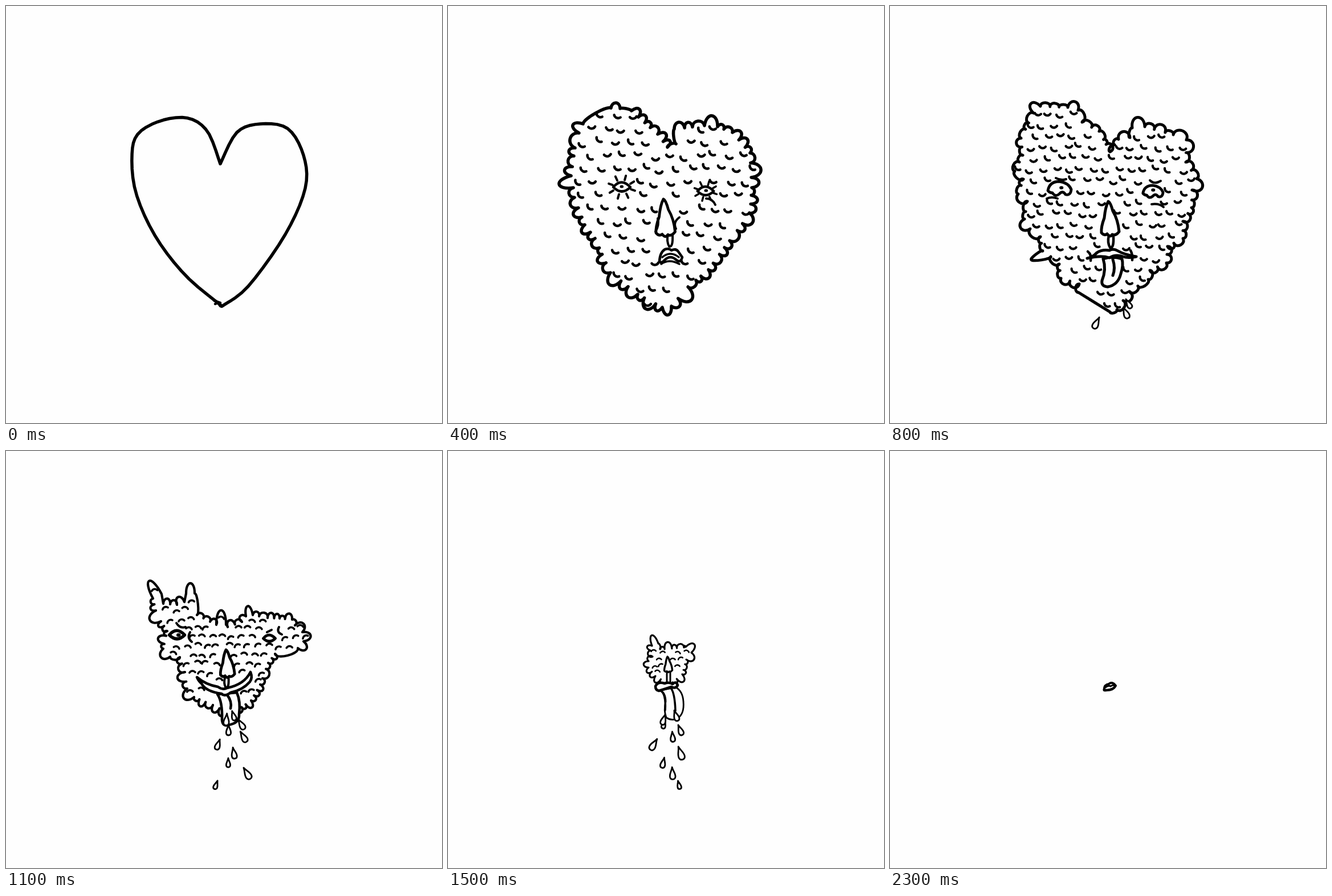
These frames come from a looping animation (765 px wide and 732 px high, 2400 ms). An HTML page with a canvas:

```html
<!DOCTYPE html>
<html lang="en">
<head>
<meta charset="utf-8">
<title>Shrinking heart</title>
<style>
html, body { margin: 0; width: 100%; height: 100%; overflow: hidden; background: #fefefe; }
canvas { display: block; }
</style>
</head>
<body>
<canvas id="stage" width="765" height="732"></canvas>
<script>
const STEP = 100, STEPS = 24, PAPER = '#fefefe', PIVOT = { x: 386, y: 424 };
const ctx = document.getElementById('stage').getContext('2d');

const lerp = (a, b, u) => a + (b - a) * u;
const noise = n => { const v = Math.sin(n * 12.9898 + 4.1) * 43758.5453; return v - Math.floor(v); };

// Small shapes drawn around their own origin
const NOSE = 'M0 0Q-5 9 -7 29Q-13 45 -12 55Q-7 61 -2 57Q3 64 7 58Q13 61 19 53Q17 32 8 17Q4 2 0 0Z';
const GROOVE = 'M0 60Q-3 72 2 81Q9 83 8 61';
const ALMOND = 'M-15 0Q-1 -17 15 0Q0 15 -15 0Z';
const DROOP = 'M-20 2Q-17 -14 0 -14Q16 -12 21 0Q20 11 11 9Q6 1 0 8Q-7 14 -12 6Q-17 6 -20 2Z';
const DOT = 'M0 0h1.5';
const TEAR = new Path2D('M0 -.5C.05 -.2 .25 0 .22 .28C.18 .55 -.18 .55 -.22 .28C-.25 0 -.05 -.2 0 -.5Z');
const LASHES = Array.from({ length: 8 }, (_, i) => {
  const a = i * Math.PI / 4 + .3, c = Math.cos(a), s = Math.sin(a);
  return `M${c * 17} ${s * 13}L${c * 24} ${s * 21}`;
}).join('');

// Outline corners run clockwise: right from cleft to tip, left from tip to cleft.
// A third value makes the next side one single lobe of that height / width.
// Face parts are [path, line width, x, y, scale].
const poses = [
  {
    at: 0, size: 340, line: 5.5,
    right: '376,277 405,222 446,207 494,215 522,262 525,320 490,401 425,492 379,527',
    left: '379,527 315,473 262,404 228,328 221,262 232,224 273,201 320,197 354,221 376,277',
    face: [['M365 517L376 521M367 523L372 521M374 523Q376 530 381 526', 4.5]]
  },
  {
    at: 4, size: 350, line: 5.5, gap: 18, bump: .6, flare: -.08, tip: 999,
    mark: { gap: 27, r: 7, width: 4.5, turn: .4 },
    right: '385,248,.2 400,242,.1 397,216 450,210,.8 473,212 499,222 530,258 533,319 530,364 485,424 457,463 421,493 392,527,.9 376,529',
    left: '376,529 333,506 285,468 258,408 240,384 222,336 220,319,1.1 216,298 223,249 230,223,.9 237,207,.1 286,179,.6 302,180,.1 322,184,.7 334,195 368,225 385,248',
    face: [
      [LASHES, 4, 305, 318], [ALMOND, 4.5, 305, 318], [DOT, 5, 304, 317],
      [LASHES, 3.5, 452, 325, .85], [ALMOND, 4.5, 452, 325, .95], [DOT, 5, 452, 324],
      [NOSE, 4.8, 378, 339, 1.08], [GROOVE, 4, 386, 341],
      ['M406 371Q394 380 400 391M368 373Q371 385 364 396M453 338Q464 338 469 349', 4],
      ['M371 448Q372 432 381 427Q388 425 392 429Q400 425 404 431L411 441Q408 452 401 446Q390 436 380 446Q374 453 371 448Z', 4.5],
      ['M374 453Q388 443 406 453M376 441Q390 429 405 441', 3.5]
    ]
  },
  {
    at: 8, size: 340, line: 5, gap: 16, bump: .45, flare: .06, tip: 510,
    mark: { gap: 22.5, r: 6.5, width: 4.2, turn: .35 },
    right: '386,256 401,234 421,231,.2 425,214,.8 447,212 497,226,.5 520,235 519,274 538,303,.7 530,323 529,354 514,378 514,408 487,422 485,451 456,464 453,480 420,501 398,533 386,537',
    left: '386,537,0 331,503 332,488 300,478 297,453 282,440,.1 248,445,.1 268,430 264,405 246,391,.7 236,374 241,343 225,330 234,304 219,290 233,262 230,232 252,188,.9 264,176 312,178,.7 330,183 337,204 367,220 386,256',
    face: [
      [DROOP, 4.8, 297, 322], [DOT, 5.5, 300, 319], [DROOP, 4.8, 461, 327, .86], [DOT, 5.5, 461, 323],
      ['M291 302Q300 307 309 304M275 338Q284 334 294 338M456 306Q464 314 475 307M459 348Q472 346 480 353', 4],
      [NOSE, 5, 383, 343], [GROOVE, 4.5, 384, 343],
      ['M374 444Q380 462 372 482Q370 492 382 493Q400 490 405 470Q410 455 407 444Q390 438 374 444ZM391 445Q396 460 391 473', 5, 0, 0, 1, true],
      ['M346 443Q356 441 363 433Q372 427 385 429Q392 425 400 430Q410 436 432 440Q418 443 409 440Q396 435 385 442Q370 437 346 443Z', 5],
      ['M347 431Q354 436 352 447M422 429Q426 436 425 446', 4.5]
    ]
  },
  {
    at: 11, size: 260, line: 4.2, gap: 12.5, bump: .7, flare: .02,
    mark: { gap: 18, r: 6, width: 3.6, turn: 3.1 },
    right: '389,309 414,300 421,290,1.4 433,288 459,293 480,294 502,296 507,306,.7 520,318 522,334,.8 512,346,.2 472,356 460,372 446,410 430,438 404,456 388,458',
    left: '388,458 363,446 330,432,.8 318,417 314,388 305,362,.3 288,361,.7 276,347 283,316 272,299,.8 263,280 258,259,1.8 273,251,0 276,268 300,270 313,265,0 316,250,1.2 331,250,.1 335,288 369,305,1.5 386,305,.1 389,309',
    face: [
      [ALMOND, 5.5, 300, 323, .9], [DOT, 6, 302, 323], [ALMOND, 5, 462, 329, .7],
      ['M299 302Q305 312 315 309M323 318Q317 328 326 335M479 309Q474 318 484 322M458 318L466 314', 4],
      [NOSE, 4.8, 386, 349, .8], [GROOVE, 4, 384, 349, .82],
      ['M371 427Q380 440 379 472Q380 484 390 481Q410 478 409 462Q412 440 405 424ZM388 428Q397 440 394 452', 4.6, 0, 0, 1, true],
      ['M335 397Q350 410 372 414Q380 420 388 416Q418 410 429 388Q433 398 428 405Q415 420 394 424Q384 432 378 426Q350 422 343 408Q338 404 335 397Z', 4.6]
    ]
  },
  {
    at: 15, size: 130, line: 3.2, gap: 10.5, bump: .7, flare: .04,
    mark: { gap: 14, r: 5, width: 2.6, turn: 3.1 },
    right: '380,348 414,345 417,344,1 427,354 418,366 411,392 394,406 386,408',
    left: '386,408 364,395 352,380,.8 352,369 359,361 355,350 358,342,1.5 369,338,.2 372,348 380,348',
    face: [
      [NOSE, 3.4, 385, 361, .45], ['M384 390V406M390 388V406', 3],
      ['M372 420Q382 424 382 440Q378 455 383 468Q392 474 402 470Q415 462 413 440Q412 422 400 415Z', 2.8],
      ['M372 420Q383 425 381 455M391 416Q398 425 399 456', 3.6],
      ['M364 413Q368 404 380 408Q388 405 394 409Q400 403 403 411Q400 418 392 414Q380 418 370 421Q364 420 364 413Z', 4.6]
    ]
  },
  {
    at: 19, size: 80, line: 2,
    right: '386,411 390,412 386,413', left: '386,413 382,412 386,411',
    face: [
      ['M372 421Q384 424 388 436Q389 446 379 452Q374 462 384 465Q395 467 405 460Q416 450 416 437Q414 420 400 411Q388 412 372 421Z', 4.3],
      ['M385 418Q391 421 392 427M390 414Q397 420 398 432', 4],
      ['M373 421Q374 411 383 409Q390 404 397 409Q397 414 388 414Q380 414 373 421Z', 4]
    ]
  },
  {
    at: 23, size: 40, line: 2,
    right: '386,411 390,412 386,413', left: '386,413 382,412 386,411',
    face: [
      ['M375.500 419Q376 410 384 409Q390 404 396 412Q392 420 380 420Q375 421 375.500 419Z', 4],
      ['M378 415Q384 411 387 413Q391 410 395 412M378 419Q387 420 393 415', 3]
    ]
  }
];

// Cuts each straight side into uneven lobes: a list of [x, y, bump].
function lobes(text, { gap, bump }, seed) {
  const corners = text.split(' ').map(p => p.split(',').map(Number));
  if (!gap) return corners;
  const out = [];
  for (let i = 0; i < corners.length - 1; i++) {
    const [x, y, horn] = corners[i], [ex, ey] = corners[i + 1];
    const n = horn === undefined ? Math.max(1, Math.round(Math.hypot(ex - x, ey - y) / gap)) : 1;
    for (let j = 0; j < n; j++) {
      const id = seed + i * 7 + j, t = j ? (j + (noise(id) - .5) * .4) / n : 0;
      out.push([lerp(x, ex, t), lerp(y, ey, t), horn ?? bump * (.65 + .7 * noise(id + .5))]);
    }
  }
  return [...out, corners.at(-1)];
}

for (const p of poses) {
  p.right = lobes(p.right, p, p.at);
  p.left = lobes(p.left, p, p.at + 300);
}

// Point on a smooth curve through the list, plus the bump that follows it
function along(list, f) {
  const last = list.length - 1, pos = f * last + 1e-9;
  const i = Math.min(last - 1, Math.floor(pos)), t = pos - i;
  const pt = k => list[Math.max(0, Math.min(last, k))];
  const [a, b, c, d] = [pt(i - 1), pt(i), pt(i + 1), pt(i + 2)];
  const mix = k => b[k] + .5 * t * (c[k] - a[k] + t * (2 * a[k] - 5 * b[k] + 4 * c[k] - d[k] + t * (3 * (b[k] - c[k]) + d[k] - a[k])));
  return [mix(0), mix(1), b[2] || 0];
}

function half(a, b, side, u) {
  const count = p => p.gap ? p[side].length - 1 : 40;
  const n = Math.round(lerp(count(a), count(b), u));
  return Array.from({ length: n }, (_, i) => {
    const p = along(a[side], i / n), q = along(b[side], i / n);
    return p.map((v, k) => lerp(v, q[k], u));
  });
}

function outline(a, b, u) {
  const pts = [...half(a, b, 'right', u), ...half(a, b, 'left', u)];
  const flare = lerp(a.flare || 0, b.flare || 0, u), path = new Path2D();
  path.moveTo(pts[0][0], pts[0][1]);
  pts.forEach(([x, y, bump], i) => {
    const [ex, ey] = pts[(i + 1) % pts.length];
    const dx = ex - x, dy = ey - y, ox = dy * bump * 1.33, oy = -dx * bump * 1.33;
    path.bezierCurveTo(x + ox - dx * flare, y + oy - dy * flare, ex + ox + dx * flare, ey + oy + dy * flare, ex, ey);
  });
  path.closePath();
  return path;
}

function ink(path, width, fill) {
  if (fill) ctx.fill(path);
  ctx.lineWidth = width;
  ctx.stroke(path);
}

function placed(shape, x, y, scale, tilt = 0) {
  const path = new Path2D();
  path.addPath(shape, new DOMMatrix().translate(x, y).rotate(tilt).scale(scale));
  return path;
}

// Face parts scaled by k around the mouth
const faceParts = (pose, k) => pose.face.map(([d, width, x = 0, y = 0, scale = 1, fill = d.endsWith('Z')]) => ({
  path: placed(new Path2D(d), lerp(PIVOT.x, x, k), lerp(PIVOT.y, y, k), scale * k), width, fill
}));

// Staggered, jittered crescents that keep clear of the edge and the face
function drawMarks({ mark, at }, body, parts, share) {
  const { gap, r, width, turn } = mark;
  for (let row = 0, y = 170; y < 540; row++, y += gap * .87) {
    for (let col = 0, x = 200 + row % 2 * gap / 2; x < 560; col++, x += gap) {
      const id = row * 31 + col + at;
      const px = x + (noise(id) - .5) * gap * .4, py = y + (noise(id + .3) - .5) * gap * .4;
      ctx.lineWidth = r * 2;
      const blocked = !ctx.isPointInPath(body, px, py) || ctx.isPointInStroke(body, px, py) ||
        parts.some(p => ctx.isPointInStroke(p.path, px, py) || p.fill && ctx.isPointInPath(p.path, px, py));
      if (blocked || noise(id + .6) > share) continue;
      const a = turn + (noise(id + .9) - .5) * .9, path = new Path2D();
      path.arc(px, py - Math.cos(turn) * r * .6, r, a + .5, a + 2.5);
      ink(path, width);
    }
  }
}

// Drops leave the tongue at a steady rate, spread out and speed up
function drawDrops(time, tip = 455) {
  const every = 40, life = 400;
  for (let i = 0, born = 480; born < 1900; i++, born += every) {
    const age = (time - born) / life;
    if (age < 0 || age >= 1) continue;
    const y = 462 + 50 * age + 85 * age * age, drift = (noise(i + 50) - .5) * 2;
    if (y < tip) continue;
    const x = 390 + drift * (12 + 24 * Math.sqrt(age));
    ink(placed(TEAR, x, y, 15 + 10 * noise(i + 90), -drift * 32), 2.8, true);
  }
}

function draw(step) {
  const next = poses.findIndex(p => p.at > step);
  const a = poses.at(next < 0 ? -1 : next - 1), b = next < 0 ? a : poses[next];
  const u = a === b ? 0 : (step - a.at) / (b.at - a.at);
  const pose = u < .5 ? a : b, k = lerp(a.size, b.size, u) / pose.size;

  ctx.fillStyle = PAPER;
  ctx.fillRect(0, 0, 765, 732);
  ctx.strokeStyle = '#000';
  ctx.lineCap = ctx.lineJoin = 'round';

  const body = outline(a, b, u), parts = faceParts(pose, k);
  ink(body, lerp(a.line, b.line, u), true);
  if (pose.mark) drawMarks(pose, body, parts, a.at ? 1 : u);
  for (const { path, width, fill } of parts) ink(path, width, fill);
  drawDrops(step * STEP, pose.tip);
}

let shown = -1;
function tick() {
  const step = Math.floor(performance.now() / STEP) % STEPS;
  if (step !== shown) draw(shown = step);
  requestAnimationFrame(tick);
}
tick();
</script>
</body>
</html>
```
